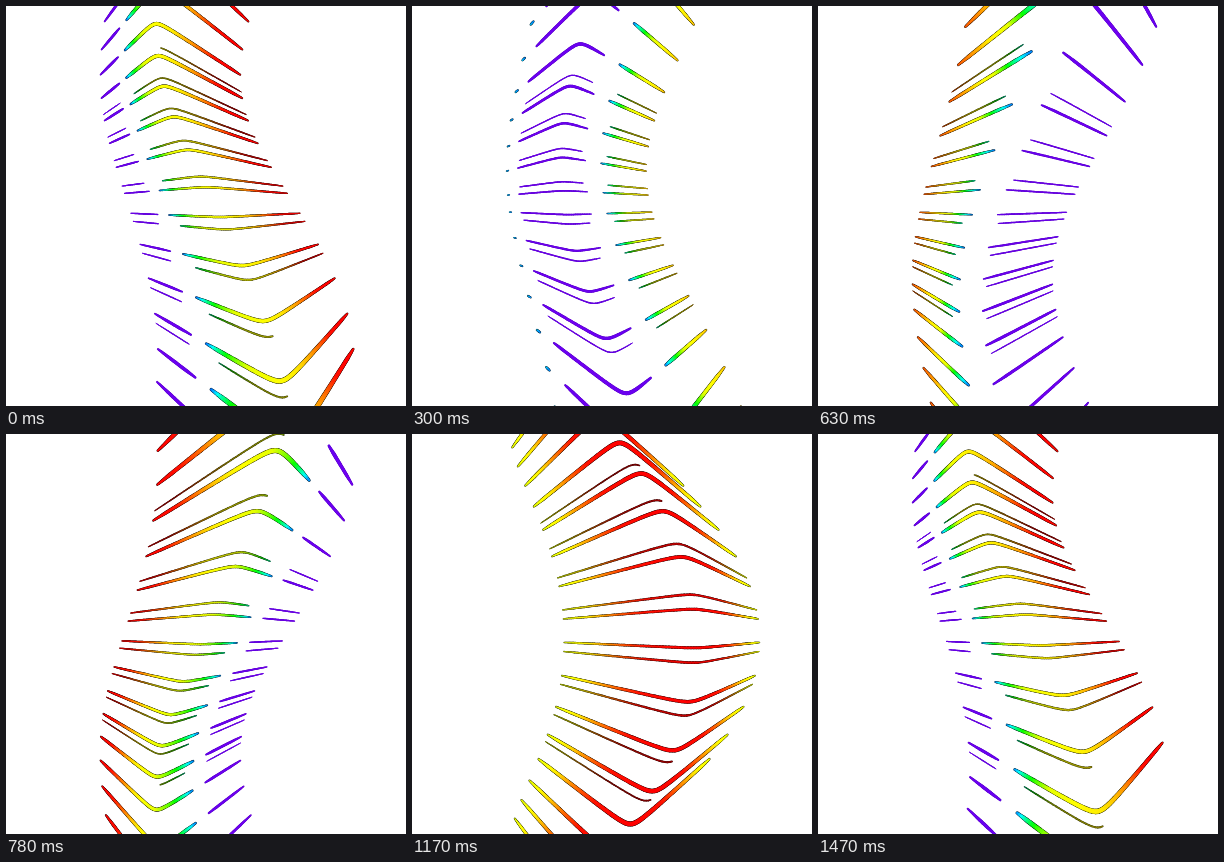
Animation of 400x400 px, one loop 1500 ms. Source, as an HTML page with a canvas:

```html
<!DOCTYPE html>
<html lang="en">
<head>
<meta charset="utf-8">
<title>Swaying rainbow column</title>
<style>
  html, body { margin: 0; width: 100%; height: 100%; overflow: hidden; background: #fff; }
  canvas { display: block; width: 100vw; height: 100vh; }
</style>
</head>
<body>
<canvas id="stage" width="400" height="400"></canvas>
<script>
const ctx = document.getElementById('stage').getContext('2d');
const LOOP = 1500, STEP = 30;
const FOCAL = 250, DEPTH = 6, SWAY = 1.48, HALF = 2.9, ROUND = 0.06;
const CENTER = 200, LIFT = 0.1;
const WAVE = 0.315, PHASE = 1.43;
const SEGMENTS = 120;

// Angle from the red side (degrees) -> hue
const HUES = [[0, 0], [22, 4], [45, 28], [70, 55], [92, 66], [103, 110], [112, 160], [121, 212], [138, 266], [180, 268]];

function hueAt(angle) {
  for (let k = 1; k < HUES.length; k++) {
    const [a0, h0] = HUES[k - 1], [a1, h1] = HUES[k];
    if (angle <= a1) return h0 + (h1 - h0) * (angle - a0) / (a1 - a0);
  }
  return 268;
}

const clamp01 = v => Math.max(0, Math.min(1, v));

// Front corner of the column at height y
function cornerAt(y, turn) {
  const sway = SWAY * Math.cos(WAVE * y - turn - PHASE);
  return { x: sway, z: DEPTH - sway };
}

// Point on the two visible sides; u runs from -1 (left) to 1 (right)
function project(corner, y, u) {
  const bend = (Math.hypot(u, ROUND) - ROUND) / (Math.hypot(1, ROUND) - ROUND);
  const scale = FOCAL / (corner.z + HALF * bend);
  return { x: CENTER + (corner.x + u * HALF) * scale, y: CENTER + y * scale, scale };
}

function stroke(seg, width, color) {
  ctx.strokeStyle = color;
  ctx.lineWidth = width;
  ctx.beginPath();
  ctx.moveTo(seg.a.x, seg.a.y);
  ctx.lineTo(seg.b.x, seg.b.y);
  ctx.stroke();
}

// Height up to which a rim can be seen on the left and right side
function sightLimits(corner, y, turn, thin) {
  const left = (corner.z + corner.x) / Math.SQRT2;
  const right = (corner.z - corner.x) / Math.SQRT2;
  if (thin) return [0.86 * left, 0.86 * right];
  const receding = Math.sin(WAVE * y - turn - PHASE) * y > 0;
  return [Infinity, receding ? 1.2 * right : Infinity];
}

function drawRim(height, turn, thin) {
  const y = height - LIFT, level = Math.abs(height);
  const corner = cornerAt(y, turn);
  const limits = sightLimits(corner, y, turn, thin);
  const redAngle = turn * 180 / Math.PI - 279.5;
  const gap = thin ? [113, 140] : [121, 137];
  const segments = [];

  for (let k = 0; k < SEGMENTS; k++) {
    const u0 = -1 + 2 * k / SEGMENTS, u1 = u0 + 2 / SEGMENTS, u = (u0 + u1) / 2;
    const angle = Math.atan2(u, 1 - Math.abs(u)) * 180 / Math.PI;
    const turned = (((angle - redAngle) % 360) + 360) % 360;
    const delta = Math.min(turned, 360 - turned);
    if (delta > gap[0] && delta < gap[1]) continue;

    const room = limits[u < 0.04 ? 0 : 1] - level;
    if (room < 0) continue;

    const a = project(corner, y, u0), b = project(corner, y, u1);
    const purple = delta > gap[1];
    const fromGap = purple ? delta - gap[1] : gap[0] - delta;
    const taper = 0.6 + 0.4 * clamp01(Math.min(fromGap / 10, (1 - Math.abs(u)) / 0.15));
    const size = thin
      ? 0.026 + 0.014 * clamp01(room / 3)
      : 0.042 + 0.014 * Math.min(level, 4.4);
    const width = a.scale * size * taper * (purple ? 0.78 : 1);
    segments.push({ a, b, width, purple, hue: hueAt(delta) });
  }

  for (const s of segments) {
    stroke(s, s.width + 0.5, `hsl(${s.hue},100%,${s.purple ? 40 : 13}%)`);
  }
  const light = thin ? Math.max(28, 50 - 7 * level) : 50;
  for (const s of segments) {
    stroke(s, Math.max(0.6, s.width - 0.5), `hsl(${s.hue},100%,${s.purple ? 47 : light}%)`);
  }
}

function render(time) {
  const t = Math.floor((time % LOOP) / STEP) * STEP;
  const turn = 2 * Math.PI * t / LOOP;
  ctx.fillStyle = '#fff';
  ctx.fillRect(0, 0, 400, 400);
  ctx.lineCap = 'round';
  for (let row = 8; row >= 0; row--) {
    for (const side of [-1, 1]) {
      drawRim(side * (row + 0.62), turn, true);
      drawRim(side * (row + 0.35), turn, false);
    }
  }
}

const start = performance.now();
function tick() {
  render(performance.now() - start);
  requestAnimationFrame(tick);
}
tick();
</script>
</body>
</html>
```
